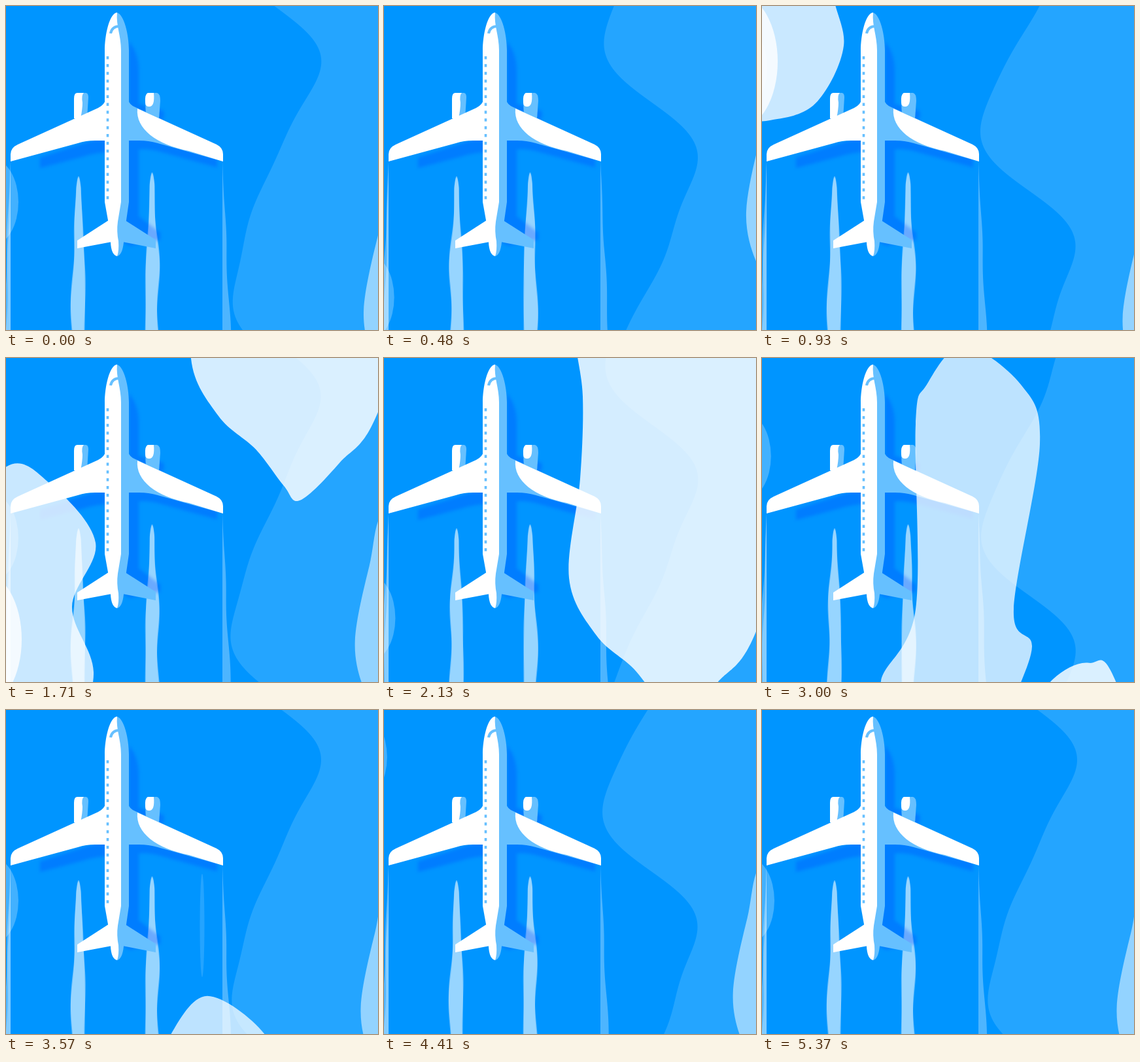
An HTML page with a canvas for the animation above (5.4 s loop, 569x496 px).

```html
<!DOCTYPE html>
<html>
<head>
<meta charset="utf-8">
<style>
html, body { margin: 0; width: 100%; height: 100%; overflow: hidden; background: #0095ff; }
canvas { display: block; }
</style>
</head>
<body>
<canvas id="stage" width="569" height="496"></canvas>
<script>
const ctx = document.getElementById('stage').getContext('2d');
const W = 569, H = 496, LOOP = 5400, TAU = Math.PI * 2;
const SKY = '#0095ff', TINT = '#66c0ff', DRIFT = 0.8;
const { sin, cos, sqrt } = Math;
const white = a => `rgba(255,255,255,${a})`;
const mod = (a, n) => ((a % n) + n) % n;
const clamp = v => Math.max(0, Math.min(1, v));
const smooth = v => (v = clamp(v), v * v * (3 - 2 * v));

function fill(d, color) {
  ctx.fillStyle = color;
  ctx.fill(new Path2D(d));
}

function polygon(points, color) {
  ctx.beginPath();
  for (const p of points) ctx.lineTo(...p);
  ctx.fillStyle = color;
  ctx.fill();
}

function oval(x, y, rx, ry, color) {
  ctx.beginPath();
  ctx.ellipse(x, y, rx, ry, 0, 0, TAU);
  ctx.fillStyle = color;
  ctx.fill();
}

// Smooth closed shape through key points, shifted by (dx, dy)
function blob(points, dx, dy, color) {
  const n = points.length;
  const at = i => { const [x, y] = points[mod(i, n)]; return [x + dx, y + dy]; };
  ctx.beginPath();
  ctx.moveTo(...at(0));
  for (let i = 0; i < n; i++) {
    const a = at(i - 1), b = at(i), c = at(i + 1), d = at(i + 2);
    ctx.bezierCurveTo(b[0] + (c[0] - a[0]) / 6, b[1] + (c[1] - a[1]) / 6,
      c[0] - (d[0] - b[0]) / 6, c[1] - (d[1] - b[1]) / 6, c[0], c[1]);
  }
  ctx.fillStyle = color;
  ctx.fill();
}

// Wavy coastline sliding down one wavelength per cycle while it sways
function coast(t) {
  const u = mod(t, 1800) / 1800, sway = sin(Math.PI * u) ** 0.7;
  const points = [[W, H], [W, 0]];
  for (let y = 0; y <= H; y += 4) {
    const a = TAU * (y / 540 - u);
    const x = 406 + 10 * cos(a) + 60 * sin(a) - 3 * cos(2 * a) + 18 * sin(2 * a) - 2 * cos(3 * a) + 6 * sin(3 * a);
    points.push([x + sway * (3 - 16 * cos(a) + 6 * sin(a) + 5.5 * cos(2 * a)), y]);
  }
  polygon(points, '#24a5ff');
}

const SHOAL = [[0, 0], [22, -115], [50, -205], [150, -200], [150, 130], [41, 102], [14, 74]];

function shoal(t) {
  const p = mod(t + 450, 900) - 450;
  blob(SHOAL, 547 + 0.15 * p + 93 * (p / 450) ** 4, 465 + 0.36 * p, '#93d3ff');
}

function islet(t) {
  const u = mod(t, 1800);
  for (const p of [u - 1800, u])
    oval(-21 - 17 * (p / 1080) ** 2, 300 + 0.28 * p + 0.00005 * p * p, 40, 66, white(0.26));
}

// Key points are relative to the lowest point of each cloud
const LEFT = [[25, 0], [85, -27], [125, -112], [108, -205], [134, -316], [101, -416], [137, -514],
  [70, -602], [0, -630], [-90, -500], [-90, -120], [-30, -10]];
const RIGHT = [[450, 0], [425, -22], [382, -78], [325, -129], [283, -217], [300, -369], [304, -495], [293, -585],
  [310, -625], [345, -650], [398, -690], [445, -758], [500, -783], [545, -745], [650, -400], [569, -135], [510, -57]];
const MIDDLE = [[298, 0], [255, -17], [218, -50], [203, -95], [205, -130], [182, -197], [235, -307], [235, -590],
  [252, -651], [308, -710], [396, -651], [425, -560], [385, -307], [413, -250], [380, -149], [398, -115],
  [365, -58], [325, -22]];

function clouds(t) {
  const left = 172 + DRIFT * (t - 930);
  blob(LEFT, 0, left, white(0.79));
  for (const lobe of [88, 366]) oval(-35, left - lobe, 59, 102, white(0.8));
  blob(RIGHT, 0, 217 + DRIFT * (t - 1710), white(0.83));
  blob(MIDDLE, 0, 307 + DRIFT * (t - 2520), white(0.74));
  oval(300, 329 + DRIFT * (t - 3570), 3.5, 79, white(0.14));
}

function shadow() {
  ctx.save();
  ctx.filter = 'blur(2.5px)';
  fill(`M52 232 L152 200 H188 V54 Q203 72 203 100 V150 L240 160 Q245 168 238 175 L323 234 V247
    L232 222 Q212 217 203 220 V322 L236 347 V358 L190 367 L176 360 V224 H152 Q135 225 120 230 L52 248Z`,
    'rgba(0,70,255,0.3)');
  ctx.restore();
}

function plane() {
  // Engines
  fill('M112 133 H122 Q126 133 126 140 L124 172 H112Z', TINT);
  fill('M104 172 V142 Q104 133 109 133 H119 Q115 136 117 148 Q117 158 114 172Z', '#fff');
  fill('M216 133 H231 Q236 134 236 145 L234 173 L214 165 Q212 145 216 133Z', TINT);
  fill('M217 133 H226 Q228 154 219 154 Q213 154 213 148 Q212 135 217 133Z', '#fff');
  // Wings
  fill('M152 143 Q151 151 141 156 L18 212 Q7 217 7 227 V238 L110 210 Q122 206 136 206 H156Z', '#fff');
  fill('M187 143 Q188 151 198 155 L322 212 Q332 217 332 227 V238 L232 210 Q218 206 204 206 H184Z', TINT);
  fill('M201 157 L322 212 Q332 217 332 227 V238 L280 222 C230 212 198 188 201 157Z', '#fff');
  // Tail
  fill('M157 328 L109 359 V371 L162 361Z', '#fff');
  fill('M182 328 L229 358 V371 L178 361Z', TINT);
  // Fuselage
  fill('M169 10 C181 12 188 45 188 68 V300 L184 328 L180 362 Q178 381 170 383 L166 370 L160 60Z', TINT);
  fill(`M170 10 C158 11 151 45 151 68 V300 L156 328 L160 362 Q161 381 170 383 Q173 375 172 360
    Q169 345 171 330 L176 300 V68 C176 45 168 30 170 10Z`, '#fff');
  // Cockpit and windows
  ctx.strokeStyle = TINT;
  ctx.lineWidth = 4;
  ctx.stroke(new Path2D('M160 42 Q162 31 174 31'));
  ctx.fillStyle = TINT;
  for (let i = 0; i < 19; i++) ctx.fillRect(153.7, 77 + i * 11.9, 3.6, 4.5);
}

// Engine trail: a widening ribbon with soft bulges running down it
function engineTrail(x, tip, bulge, phase, alpha) {
  const left = [], right = [];
  for (let y = tip; y <= H + 4; y += 4) {
    const d = y - tip, grow = smooth((d - 10) / 150);
    const w = 3.6 * sqrt(clamp((d + 1) / 18)) + 6.3 * grow
      + 1.3 * clamp(d / 90) * cos(TAU * ((y - bulge) / 140 - phase));
    const c = x + 1.2 * grow * sin(TAU * (y / 170 - phase));
    left.push([c - w, y]);
    right.unshift([c + w, y]);
  }
  polygon(left.concat(right), white(alpha));
}

// Wing-tip trail: straight on one side, wavy on the other
function tipTrail(x, side, phase, width) {
  const points = [[x, H + 4]];
  for (let y = 238; y <= H + 4; y += 4) {
    const d = (y - 238) / 258;
    const wave = 1.2 * clamp(d * 2) * sin(TAU * (y / 150 - phase));
    points.push([x + side * (width * d + wave), y]);
  }
  polygon(points, white(0.3));
}

function trails(t) {
  const p = mod(t, 900) / 900;
  for (const [x, tip, bulge] of [[111, 261, 445], [223.5, 255, 385]]) {
    engineTrail(x, tip, bulge, p, 0.4);
    engineTrail(x, tip + 2, bulge + 20, p, 0.32);
  }
  tipTrail(331, 1, p, 12);
  tipTrail(7, -1, p, 11);
  tipTrail(7, -1, p + 0.3, 7);
}

function draw(now) {
  const t = mod(now, LOOP);
  ctx.fillStyle = SKY;
  ctx.fillRect(0, 0, W, H);
  coast(t);
  shoal(t);
  islet(t);
  trails(t);
  shadow();
  plane();
  clouds(t);
}

const start = performance.now();
function frame() {
  draw(performance.now() - start);
  requestAnimationFrame(frame);
}
frame();
</script>
</body>
</html>
```
